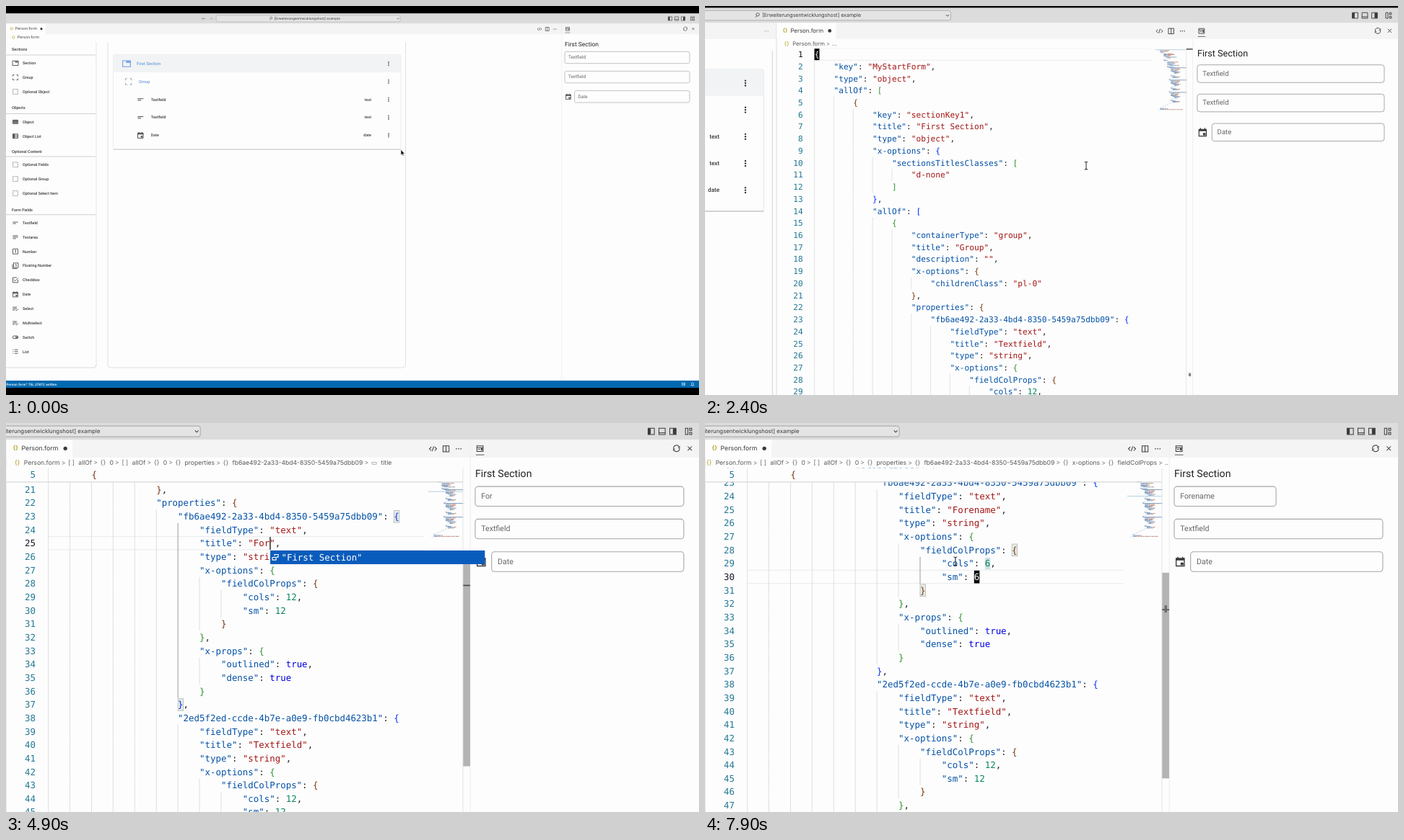
Animation of 960 by 540 pixels, one loop 8000 ms. Source, as an HTML page:

```html
<!DOCTYPE html>
<html lang="de">
<head>
<meta charset="utf-8">
<title>Form editor</title>
<style>
  html, body { margin: 0; width: 100%; height: 100%; overflow: hidden; background: #000; }
  svg { display: block; width: 100vw; height: 100vh; }
  text { text-rendering: geometricPrecision; white-space: pre; }
  .ui { font-family: Inter, "Liberation Sans", sans-serif; }
  .app { font-family: Roboto, "Liberation Sans", sans-serif; }
  .mono { font-family: "DejaVu Sans Mono", "Liberation Mono", monospace; }
</style>
</head>
<body>
<svg viewBox="0 0 960 540" xmlns="http://www.w3.org/2000/svg">
  <defs>
    <clipPath id="editorClip"><rect x="385" y="48" width="385" height="472"/></clipPath>
    <clipPath id="crumbClip"><rect x="385" y="39" width="384" height="9"/></clipPath>
  </defs>
  <g id="camera">
    <g id="chrome"></g>
    <g id="designer"></g>
    <g id="editor">
      <g id="tab"></g>
      <g clip-path="url(#crumbClip)" id="crumbs"></g>
      <g clip-path="url(#editorClip)">
        <g id="scroller"><g id="code"></g><g id="caret"></g></g>
        <g id="minimap"></g><g id="sticky"></g><g id="ruler"></g>
      </g>
    </g>
    <g id="preview"></g>
    <g id="status"></g>
    <g id="popup"></g>
    <g id="mouse"></g>
  </g>
</svg>
<script>
const LOOP = 8000, SPLIT = 1300;
const PAPER = '#fdfdfd', TABS = '#f4f4f4', BAR = '#dcdcdc', INK = '#3a3a3a', EDGE = '#d9d9d9', GUIDE = '#dddddd', ACTIVE_ROW = '#e9e9e9';
const ROW = 11.17, TOP = 53.6, CH = 4.479, COL0 = 419.9, FONT = 7.44;
const $ = id => document.getElementById(id);
const cache = {};
const set = (id, html) => { if (cache[id] !== html) $(id).innerHTML = cache[id] = html; };

const esc = s => s.replace(/&/g, '&amp;').replace(/</g, '&lt;').replace(/>/g, '&gt;');
// y is the middle of the lower-case letters' line
const text = (s, x, y, size, { cls = 'ui', fill = INK, anchor = 'start', weight = 400 } = {}) =>
  `<text class="${cls}" x="${x}" y="${y + size * .35}" font-size="${size}" fill="${fill}" text-anchor="${anchor}" font-weight="${weight}">${esc(s)}</text>`;
const rect = (x, y, w, h, fill, extra = '') => `<rect x="${x}" y="${y}" width="${w}" height="${h}" fill="${fill}" ${extra}/>`;
const line = (x1, y1, x2, y2, color = EDGE, w = .6) => `<path d="M${x1} ${y1}L${x2} ${y2}" stroke="${color}" stroke-width="${w}"/>`;
const box = (x, y, w, h, r = 2, color = EDGE, fill = 'none') => rect(x, y, w, h, fill, `rx="${r}" stroke="${color}" stroke-width=".65"`);

const ICONS = {
  folder: 'M-4-3H4V3.2H-4ZM0-3V-1.2H4M0-2.2H4',
  group: 'M-3.5-1.5V-3.5H-1.5M1.5-3.5H3.5V-1.5M3.5 1.5V3.5H1.5M-1.5 3.5H-3.5V1.5',
  grid: 'M-3.5-2.5H3.5V2.5H-3.5ZM-3.5 0H3.5M-1.2-2.5V2.5M1.2-2.5V2.5M-3.5-1.2H3.5M-3.5 1.2H3.5',
  rows: 'M-3.5-3H3.5V3H-3.5ZM-3.5-1H3.5M-3.5 1H3.5M-1.5-3V3M-2.5-3V3',
  short: 'M-3.6-1H3.6M-3.6 1H.8',
  lines: 'M-3.6-2H3.6M-3.6 0H3.6M-3.6 2H.8',
  number: 'M-3.5-3.5H3.5V3.5H-3.5ZM-.8-1.5L.3-2V2',
  float: 'M-2.5-3.8H4V2.6H-2.5ZM-4-2V4H2.5M0-1.8L1-2.2V1.3',
  check: 'M3.5-.5V3.5H-3.5V-3.5H2M-2-.5L-.3 1.4L4-3',
  cal: 'M-3.4-2.7H3.4V3.6H-3.4ZM-3.4-2.1H3.4M-3.4-1.4H3.4M-2-4V-2.7M2-4V-2.7M.7 1.1H2.3V2.4H.7ZM1 1.7H2',
  select: 'M-3.8-2H2M-3.8 0H2M-3.8 2H-1M.2 1.8L1.4 3L4 .3',
  switch: 'M-2-1.8H2A1.8 1.8 0 0 1 2 1.8H-2A1.8 1.8 0 0 1-2-1.8M.6-.7H2.6V.7H.6Z',
  list: 'M-3.6-2.6H-2.6M-3.6 0H-2.6M-3.6 2.6H-2.6M-1.2-2.6H3.6M-1.2 0H3.6M-1.2 2.6H3.6',
  code: 'M-1.4-1.6L-3 0L-1.4 1.6M1.4-1.6L3 0L1.4 1.6M.6-2L-.6 2',
  split: 'M-2.5-2.5H2.5V2.5H-2.5ZM0-2.5V2.5',
  preview: 'M-2.6-2.4H2.6V2.2H-2.6ZM-2.6-1H2.6M-1.6.4H0M1-.2H1.8V1H1Z',
  refresh: 'M-2.4.2A2.4 2.4 0 0 1 2-1.5M2.4-.2A2.4 2.4 0 0 1-2 1.5M2.5-2V-.6H1.2M-2.5 2V.6H-1.2',
  close: 'M-1.7-1.7L1.7 1.7M1.7-1.7L-1.7 1.7',
  left: 'M2.3 0H-2.3M-.6-1.7L-2.3 0L-.6 1.7',
  right: 'M-2.3 0H2.3M.6-1.7L2.3 0L.6 1.7',
  down: 'M-1.4-.7L0 .7L1.4-.7',
  search: 'M-2 2L-.4.4M-.4.4A1.6 1.6 0 1 1 1.8-1.8A1.6 1.6 0 0 1-.4.4',
  frame: 'M-2.6-2.6H2.6V2.6H-2.6Z',
  tiles: 'M-2.6-2.6H-.6V2.6H-2.6ZM.8-2.6H2.6V-.8H.8ZM.8.8H2.6V2.6H.8Z',
  bell: 'M-2 1.5H2L1.4.4V-.8A1.4 1.4 0 0 0-1.4-.8V.4ZM-.5 2.3H.5'
};
const icon = (name, x, y, { color = INK, scale = 1, w = .8, dash = '' } = {}) =>
  `<path transform="translate(${x} ${y}) scale(${scale})" d="${ICONS[name]}" fill="none" stroke="${color}" stroke-width="${w}" stroke-dasharray="${dash}"/>`;
const dots = (x, y, dx, dy, r, color = INK) =>
  [-1, 0, 1].map(i => `<circle cx="${x + i * dx}" cy="${y + i * dy}" r="${r}" fill="${color}"/>`).join('');

const PALETTE = [
  ['Sections', 60.3, 68, ['folder|Section', 'group|Group', 'dashed|Optional Object']],
  ['Objects', 141.3, 149.5, ['grid|Object', 'rows|Object List']],
  ['Optional Content', 202, 209, ['dashed|Optional Fields', 'dashed|Optional Group', 'dashed|Optional Select Item']],
  ['Form Fields', 283, 289.7, ['short|Textfield', 'lines|Textarea', 'number|Number', 'float|Floating Number', 'check|Checkbox',
    'cal|Date', 'select|Select', 'select|Multiselect', 'switch|Switch', 'list|List']]
];

function palette() {
  let out = line(125, 50, 125, 499) + `<path d="M0 502H121Q125 502 125 498" fill="none" stroke="${EDGE}"/>`;
  for (const [title, y, rule, items] of PALETTE) {
    out += text(title, 8, y, 5.5, { cls: 'app', weight: 500 }) + line(0, rule, 124, rule, '#bdbdbd', .7);
    items.forEach((item, i) => {
      const [kind, label] = item.split('|'), iy = rule + 11.3 + i * 19.85;
      out += kind === 'dashed' ? icon('frame', 13, iy, { scale: 1.3, w: .6, dash: '1 .7', color: '#666' }) : icon(kind, 13, iy);
      out += text(label, 23, iy, 5.4, { cls: 'app', weight: 500 });
    });
  }
  return out;
}

function chrome() {
  let out = rect(0, 10.5, 960, 519.5, PAPER) + rect(0, 10.5, 960, 14, BAR) + rect(0, 24.5, 960, 14.8, TABS);
  out += box(291, 13, 255, 9, 2, '#b0b0b0', '#e4e4e4') + icon('search', 367, 17.5, { scale: .9, w: .6 });
  out += text('[Erweiterungsentwicklungshost] example', 371.5, 17.4, 4.7);
  out += icon('left', 274, 17.5, { color: '#777', w: .6 }) + icon('right', 284, 17.5, { color: '#aaa', w: .6 }) + icon('down', 543, 17.5, { w: .6 });
  out += [920, 929, 938].map(x => icon('frame', x, 17.5, { w: .6 })).join('') + icon('tiles', 951, 17.5, { w: .6 });
  out += rect(917.4, 15, 2.2, 5, INK) + rect(926.4, 18.4, 5.2, .6, INK) + rect(938, 15, 2.6, 5, INK);
  out += icon('preview', 778, 32, { w: .6 }) + line(774.5, 37, 781.5, 37, INK, .5);
  out += icon('refresh', 941, 31.7, { w: .6 }) + icon('close', 952, 31.7, { w: .6 });
  return out + line(769.8, 25, 769.8, 520, '#e8e8e8') + palette();
}

const fileTab = (x, w) => rect(x, 24.5, w, 14.8, PAPER) + text('{}', x + 5.5, 31.3, 4.8, { fill: '#b09a10', weight: 600 }) +
  text('Person.form', x + 12.7, 31.5, 5.25) + `<circle cx="${x + 49}" cy="31.7" r="1.6" fill="${INK}"/>`;
const toolbar = icon('code', 739, 32, { w: .6 }) + icon('split', 749.8, 32, { w: .6 }) + dots(760.3, 32, 1.9, 0, .5);

function designer(split) {
  const right = split ? 373 : 547, canvas = split ? 381 : 553.5;
  let out = fileTab(0, 55) + text('{}', 8, 43.4, 4.8, { fill: '#b09a10', weight: 600 }) + text('Person.form', 15.7, 43.6, 5.25);
  out += split ? dots(375.5, 32, 1.6, 0, .4, '#999') : toolbar;
  out += `<path d="M141 50V498Q141 502 145 502H${canvas - 4}Q${canvas} 502 ${canvas} 498V50" fill="none" stroke="${EDGE}" stroke-width=".8"/>`;
  out += box(148.5, 67.5, right - 148.5, 131.5, 1.5, '#e4e4e4', PAPER) + rect(148.5, 67.5, right - 148.5, 24.5, '#f1f3f5');
  out += line(149, 199, right, 199, '#c0c0c0', .9);
  const blue = '#6f9fdf';
  out += icon('folder', 167, 80, { color: blue, scale: 1.35 }) + text('First Section', 181, 80, 5.9, { cls: 'app', fill: blue, weight: 500 });
  out += icon('group', 169.7, 105, { color: '#8fa4bb', scale: 1.2 }) + text('Group', 184, 105, 5.7, { cls: 'app', fill: blue, weight: 500 });
  [['short', 'Textfield', 'text'], ['short', 'Textfield', 'text'], ['cal', 'Date', 'date']].forEach(([kind, label, type], i) => {
    const y = 129.8 + i * 24.8;
    out += icon(kind, 186.3, y, { scale: 1.1 }) + text(label, 200.7, y, 5.4, { cls: 'app', weight: 500 }) +
      text(type, right - 41, y, 5.4, { cls: 'app', weight: 500, anchor: 'end' });
  });
  for (let i = 0; i < 5; i++) out += dots(right - 17, 80.2 + i * 24.8, 0, 2.3, .8);
  return out;
}

// Source text: each entry is [indent level, content]
function source({ title, cols, sm }) {
  const field = (key, type, label, kind, c, s, last) => [[6, `"${key}": {`], [7, `"fieldType": "${type}",`], [7, `"title": "${label}",`],
    [7, `"type": "${kind}",`], [7, '"x-options": {'], [8, '"fieldColProps": {'], [9, `"cols": ${c},`], [9, `"sm": ${s}`], [8, '}'],
    [7, '},'], [7, '"x-props": {'], [8, '"outlined": true,'], [8, '"dense": true'], [7, '}'], [6, last ? '}' : '},']];
  return [[0, '{'], [1, '"key": "MyStartForm",'], [1, '"type": "object",'], [1, '"allOf": ['], [2, '{'], [3, '"key": "sectionKey1",'],
    [3, '"title": "First Section",'], [3, '"type": "object",'], [3, '"x-options": {'], [4, '"sectionsTitlesClasses": ['], [5, '"d-none"'],
    [4, ']'], [3, '},'], [3, '"allOf": ['], [4, '{'], [5, '"containerType": "group",'], [5, '"title": "Group",'], [5, '"description": "",'],
    [5, '"x-options": {'], [6, '"childrenClass": "pl-0"'], [5, '},'], [5, '"properties": {'],
    ...field('fb6ae492-2a33-4bd4-8350-5459a75dbb09', 'text', title, 'string', cols, sm),
    ...field('2ed5f2ed-ccde-4b7e-a0e9-fb0cbd4623b1', 'text', 'Textfield', 'string', 12, 12),
    ...field('71c0d4ab-9e52-4f06-b3d8-60a2ce817f45', 'date', 'Date', 'string', 12, 12, true),
    [5, '}'], [4, '}'], [3, ']'], [2, '}'], [1, '],'], [1, '"description": "",'],
    [1, '"layout": "one page with sections and plain groups"'], [0, '}']
  ].map(([level, s]) => ' '.repeat(level * 4) + s);
}

const BRACKETS = ['#0431fa', '#319331', '#7b3814'];
function highlight(lines) {
  let depth = 0;
  return lines.map(s => s.replace(/("[^"]*")(:?)|\d+|true|[{}[\]]|[^"\d{}[\]t]+|./g, (tok, str, colon) => {
    const paint = (s, c) => `<tspan fill="${c}">${esc(s)}</tspan>`;
    if (str) return paint(str, colon ? '#0451a5' : '#a31515') + colon;
    if (/^\d/.test(tok)) return paint(tok, '#098658');
    if (tok === 'true') return paint(tok, '#0000e0');
    if ('{['.includes(tok)) return paint(tok, BRACKETS[depth++ % 3]);
    if ('}]'.includes(tok)) return paint(tok, BRACKETS[--depth % 3]);
    return tok;
  }));
}

const rowY = n => TOP + (n - 1) * ROW;
const colX = c => COL0 + c * CH;
const codeLine = (n, y, html, active) =>
  text(String(n), 409.3, y, FONT, { cls: 'mono', anchor: 'end', fill: active ? '#15152a' : '#237893' }) +
  `<text class="mono" x="${COL0}" y="${y + FONT * .35}" font-size="${FONT}" fill="#222" xml:space="preserve">${html}</text>`;
const cell = (n, c, len, fill, stroke = 'none') =>
  rect(colX(c), rowY(n) - 5, len * CH, 10, fill, `stroke="${stroke}" stroke-width=".5"`);

// Editing steps: time, cursor line and column, mode, and the values that changed
const steps = [{ at: 0, line: 1, col: 0, mode: 'block', title: 'Textfield', cols: '12', sm: '12', label: 'Textfield', half: false }];
const step = (at, change) => steps.push({ ...steps[steps.length - 1], at, ...change });
step(SPLIT, {});
step(3250, { line: 25, col: 38, word: 'Textfield' });
step(4150, { title: '', label: '', mode: 'bar', word: '' });
[4400, 4600, 4800, 4950, 5050, 5150, 5250, 5350].forEach((at, i) => {
  const title = 'Forename'.slice(0, i + 1);
  step(at, { title, label: title, col: 39 + i });
});
step(5450, { mode: 'block', col: 45 });
step(5550, { line: 29, col: 44 });
step(5700, { cols: '', mode: 'bar' });
step(6400, { cols: '6', col: 45, half: true });
step(6500, { mode: 'block', col: 44 });
step(6800, { line: 30, col: 42 });
step(7100, { sm: '', mode: 'bar' });
step(7400, { sm: '6', col: 43 });
step(7600, { mode: 'block', col: 42, word: '6' });
const stepAt = t => steps.filter(s => s.at <= t).pop();

const scopes = { 25: [23, 64, 37, 24], 29: [28, 49, 31, 32], 30: [28, 49, 31, 32], 1: [1, 0, 75, 0] };

function code(s, lines, colored) {
  const [open, openCol, close, closeCol] = scopes[s.line];
  let out = [-5.6, 5.4].map(d => line(COL0, rowY(s.line) + d, 731.5, rowY(s.line) + d, ACTIVE_ROW)).join('');
  out += cell(open, openCol, 1, '#e4ebe4', '#b9b9b9') + cell(close, closeCol, 1, '#e4ebe4', '#b9b9b9');
  if (s.word === 'Textfield') out += cell(25, 38, 9, '#dadde4') + cell(40, 38, 9, '#dadde4');
  if (s.word === '6') out += cell(29, 44, 1, '#d0dfe6');
  lines.forEach((src, i) => {
    const n = i + 1, indent = src.search(/\S/), y = rowY(n);
    for (let c = 0; c < indent; c += 4) {
      const active = s.line > 1 && c === closeCol && n > open && n < close;
      out += line(colX(c), y - ROW / 2, colX(c), y + ROW / 2, active ? '#939393' : GUIDE, .55);
    }
    out += codeLine(n, y, colored[i], n === s.line);
  });
  return out;
}

function caret(s, lines, t) {
  if ((t - s.at) % 1000 >= 500) return '';
  const x = colX(s.col), y = rowY(s.line);
  if (s.mode === 'bar') return rect(x, y - 5.3, .8, 10.6, '#111');
  return rect(x, y - 5.3, CH, 10.6, '#000') + text(lines[s.line - 1][s.col] || ' ', x, y, FONT, { cls: 'mono', fill: '#fff' });
}

function minimap(s, lines) {
  let out = rect(732, 48, 32, 62, PAPER);
  lines.forEach((src, i) => {
    for (const m of src.matchAll(/\S+/g))
      out += rect(738 + m.index * .41, 49 + i * .76, m[0].length * .41, .55, /:$|[{}[\]]/.test(m[0]) ? '#5f82ab' : '#b0705c', 'opacity=".85"');
  });
  return out + rect(735, 49 + (s.line - 1) * .76, 29, .6, '#b4cfe0');
}

function sticky(scroll, colored) {
  const pinned = scroll <= 4 ? [] : scroll > 7 && scroll < 11 ? [5, 9] : [5];
  if (!pinned.length) return '';
  const h = pinned.length * ROW;
  return rect(385, 48, 379, h, PAPER) + line(385, 48 + h + .4, 764, 48 + h + .4, '#d8d8d8', .7) +
    pinned.map((n, i) => line(colX(0), 48 + i * ROW, colX(0), 48 + (i + 1) * ROW, GUIDE, .5) + codeLine(n, TOP + i * ROW, colored[n - 1])).join('');
}

function ruler(s, scroll) {
  const at = n => 48.6 + (n - 1) * 4.036, mark = n => rect(764, at(n) - .4, 5.8, 1, '#4a4a4a');
  let out = line(763.8, 48, 763.8, 520, '#e4e4e4');
  if (scroll > 0) out += rect(764, 48.6 + scroll * 4.036, 5.8, 171, '#b4b4b4');
  out += mark(s.line);
  if (s.line === 1) out += rect(766, 349, 2.2, 3, '#888');
  if (s.word === 'Textfield') out += [25, 40].map(n => rect(766, at(n) + .5, 2.2, 3, '#6c6c6c')).join('');
  if (s.word === '6') out += rect(766, at(29) + .5, 2, 6, '#6c6c6c');
  return out;
}

function crumbs(lineNo) {
  const path = ['{}|Person.form'];
  if (lineNo > 1) path.push('[ ]|allOf', '{}|0', '[ ]|allOf', '{}|0', '{}|properties', '{}|fb6ae492-2a33-4bd4-8350-5459a75dbb09');
  if (lineNo === 1) path.push('|…');
  else if (lineNo === 25) path.push('▭|title');
  else path.push('{}|x-options', '{}|fieldColProps');
  if (lineNo === 30) path.push('|…');
  const x = lineNo > 25 ? 386 : 392;
  return `<text class="ui" x="${x}" y="45.4" font-size="5.15" fill="#585858">` + path.map((p, i) => {
    const [mark, label] = p.split('|');
    const sep = i ? '<tspan dx="1.3" fill="#777">&gt;</tspan>' : '';
    const sign = mark && `<tspan dx="${i ? 2.3 : 0}" fill="${i ? '#666' : '#b09a10'}">${mark}</tspan>`;
    return `${sep}${sign}<tspan dx="${mark ? 3.2 : 1.8}">${label}</tspan>`;
  }).join('') + '</text>';
}

function preview(s) {
  const field = (x, y, right, label) => box(x, y, right - x, 16.4, 2.4, '#a6a6a6', PAPER) +
    text(label, x + 4.9, y + 7.8, 6.4, { cls: 'app', fill: '#666' });
  return text('First Section', 774, 52.7, 8.45, { cls: 'app', fill: '#222' }) +
    field(774, 63.3, s.half ? 858.5 : 947, s.label) + field(774, 90.4, 947, 'Textfield') +
    icon('cal', 779, 125.8, { w: .8 }) + field(787.6, 117.6, 947, 'Date');
}

function status(split) {
  const white = { fill: '#fff', weight: 600 };
  let out = rect(0, 520, 960, 10, '#0069b0') + text(split ? '- NORMAL --' : 'Person.form" 75L 2787C written', .5, 525, 4.5, white);
  if (split) out += [[762, 'Zeile 1, Spalte 1'], [804, 'Leerzeichen: 4'], [845, 'UTF-8'], [867, 'LF'], [879.5, '{}'], [887, 'Json'], [905, '✓'], [911, 'Neatling']]
    .map(([x, s]) => text(s, x, 525, 4.5, white)).join('');
  return out + icon('bell', 951, 525, { color: '#fff', w: .6 }) +
    icon('preview', 938.5, 525, { color: '#fff', w: .6, scale: .8 });
}

const popup = rect(604, 116.5, 178, 11.4, '#0a5cbc') +
  `<path d="M605.8 122.2h3v2.2h-3zM607.6 121v-1.2h3v2.2h-1.4" fill="none" stroke="#fff" stroke-width=".7"/>` +
  text('"First Section"', 613.2, 122.1, FONT, { cls: 'mono', fill: '#fff' });

const POINTERS = {
  arrow: '<path d="M0-2.5V5L1.8 3.4L3 6L4.2 5.4L3 3H5.3Z" fill="#111" stroke="#fff" stroke-width=".5"/>',
  hand: '<path d="M-1.5-3V1L-3 0L-1.8 4H2.6L3.3 0L-.3-.8V-3Z" fill="#fff" stroke="#222" stroke-width=".7"/>',
  beam: '<path d="M-1.5-3.6Q0-3.6 0-2.6Q0-3.6 1.5-3.6M0-2.6V2.6M-1.5 3.6Q0 3.6 0 2.6Q0 3.6 1.5 3.6" fill="none" stroke="#333" stroke-width=".7"/>'
};

const ease = p => p * p * (3 - 2 * p);
const ramp = (t, a, b) => ease(Math.min(1, Math.max(0, (t - a) / (b - a))));
// Eased value through [time, value] keys
const track = (t, keys) => keys.slice(1).reduce((v, [at, to], i) => v + (to - keys[i][1]) * ramp(t, keys[i][0], at), keys[0][1]);
// The list glides in one sweep, so it moves linearly between the marks
const scrollAt = t => t < 3150 ? 18.9 * Math.min(1, Math.max(0, (t - 2480) / 645)) : 18.9 + 2.5 * ramp(t, 7620, 7900);

function mouse(t) {
  if (t > 4150 && t < 7620) return '';
  const x = track(t, [[200, 547], [1100, 740], [2000, 740], [2700, 627], [3000, 627], [3220, 592.5]]);
  const y = track(t, [[200, 202], [1100, 34], [2000, 34], [2700, 235.7], [3000, 235.7], [3220, 110.5], [7600, 110.5], [7850, 125.5]]);
  const kind = t < 1050 ? 'arrow' : t < 2100 ? 'hand' : 'beam';
  return `<g transform="translate(${x} ${y})">${POINTERS[kind]}</g>`;
}

function draw(t) {
  const split = t >= SPLIT, s = stepAt(t), zoom = ramp(t, 1900, 2650), scroll = scrollAt(t);
  $('camera').setAttribute('transform', `translate(${-642.6 * zoom} ${-17.6 * zoom}) scale(${1 + .67 * zoom})`);
  set('designer', designer(split));
  $('editor').style.display = split ? '' : 'none';
  if (split) {
    if (s !== draw.last) {
      draw.last = s;
      draw.lines = source(s);
      draw.colored = highlight(draw.lines);
      set('code', code(s, draw.lines, draw.colored));
      set('minimap', minimap(s, draw.lines));
      set('crumbs', crumbs(s.line));
    }
    set('caret', caret(s, draw.lines, t));
    set('sticky', sticky(scroll, draw.colored));
    set('ruler', ruler(s, scroll));
    $('scroller').setAttribute('transform', `translate(0 ${-scroll * ROW})`);
  }
  set('preview', preview(s));
  set('status', status(split));
  set('popup', t >= 4800 && t < 5300 ? popup : '');
  set('mouse', mouse(t));
}

set('chrome', chrome());
set('tab', rect(385, 24.5, 385, 14.8, TABS) + rect(385, 39.3, 384.5, 480.7, PAPER) + line(384.8, 25, 384.8, 520) + fileTab(385, 55) + toolbar);

const start = performance.now();
function tick() {
  draw((performance.now() - start) % LOOP);
  requestAnimationFrame(tick);
}
tick();
</script>
</body>
</html>
```
